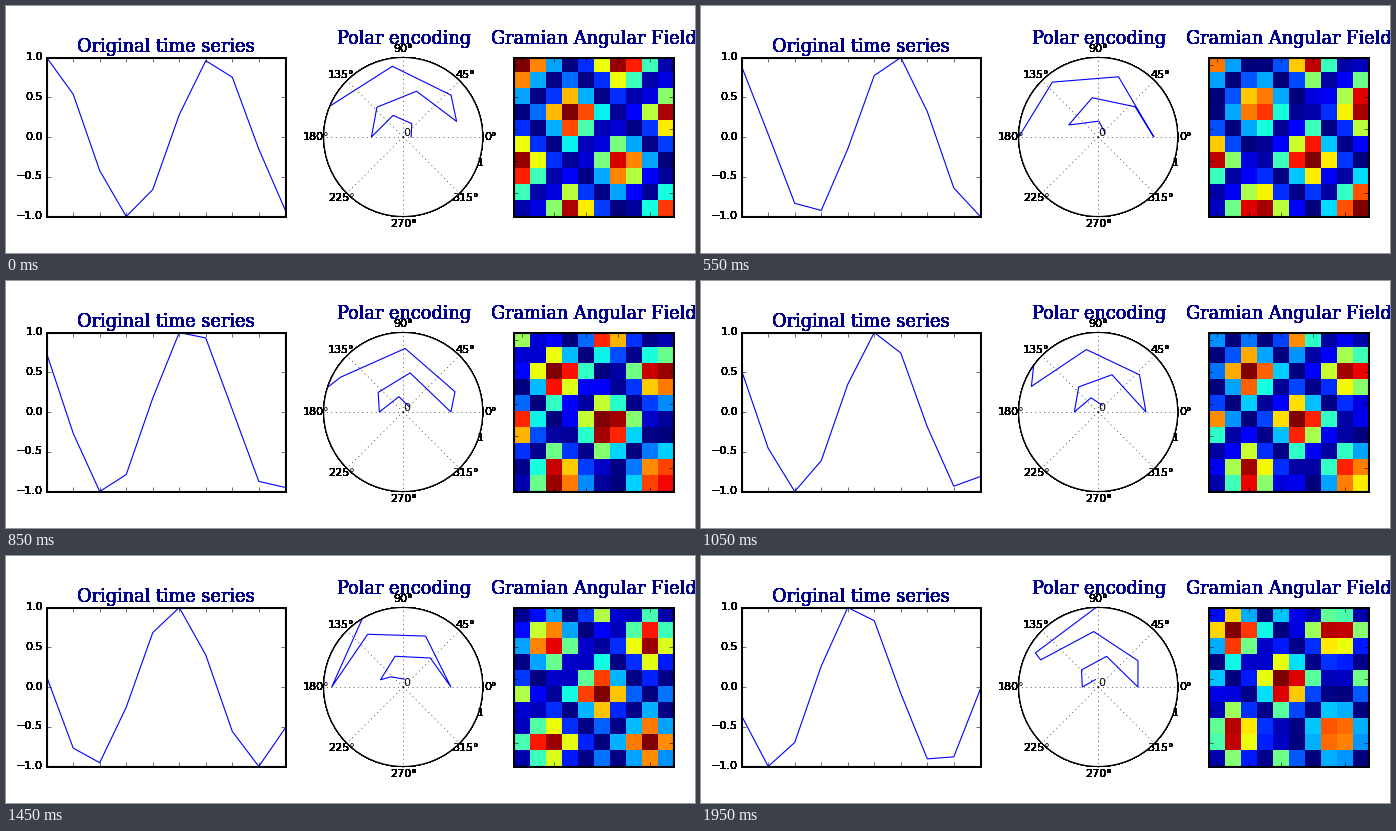
A matplotlib script that plays this animation: 689x247 px, repeating every 2 s.

```python
import numpy as np
import matplotlib.pyplot as plt
from matplotlib.animation import FuncAnimation
from matplotlib.patches import Circle, Rectangle

W, H, DPI = 689, 247, 80
FRAMES, INTERVAL = 40, 50
STEP = 0.05                  # phase advance per frame
N = 10                       # samples in the series
OVERPRINT = 16               # repeated passes give the heavy lettering
TOP, BOTTOM = 51.53, 210.47  # shared panel edges, pixels from the top
R, CX, CY = (BOTTOM - TOP) / 2, 397.2, (TOP + BOTTOM) / 2

fig = plt.figure(figsize=(W / DPI, H / DPI), dpi=DPI, facecolor="white")


def panel(x0, x1):
    return fig.add_axes([x0 / W, 1 - BOTTOM / H, (x1 - x0) / W, (BOTTOM - TOP) / H])


def framed(x0, x1, xticks, yticks):
    """Panel with inward ticks and a frame thickened on its outer side."""
    left, right, top, bottom = (int(v + 0.5) for v in (x0, x1, TOP, BOTTOM))
    fig.add_artist(Rectangle(
        ((left - 1) / W, 1 - (bottom + 2) / H), (right - left + 3) / W,
        (bottom - top + 3) / H, fc="black", lw=0, zorder=-1,
        transform=fig.transFigure))
    ax = panel(x0, x1)
    for spine in ax.spines.values():
        spine.set_linewidth(1)
    ax.set_xticks(xticks)
    ax.set_yticks(yticks)
    ax.tick_params(direction="in", length=4, width=0.5, top=True, right=True,
                   labelbottom=False, labelleft=False)
    ax.set_axisbelow(False)
    return ax


def text(x, y, s, zorder=3, **kw):
    kw = {"size": 10, "family": "DejaVu Sans", "ha": "center", "va": "center"} | kw
    fig.text(x / W, 1 - y / H, s, zorder=zorder, **kw)


def heavy(x, y, s, **kw):
    for _ in range(OVERPRINT):
        text(x, y, s, zorder=-1, **kw)


def title(x, y, s):
    heavy(x, y, s, size=16, family="DejaVu Serif", color="darkblue", va="baseline")


def label(x, y, s, **kw):
    """Heavy outside the disc, single weight where the disc covers it."""
    for put in (heavy, text):
        put(x, y - 0.4, s, **kw)


def series(n):
    """Cosine samples rescaled to span -1..1."""
    x = np.cos(np.arange(N) + STEP * n)
    lo, hi = x.min(), x.max()
    return np.clip(2 * (x - lo) / (hi - lo) - 1, -1, 1)


# Time series
levels = np.linspace(-1, 1, 5)
ax_ts = framed(40.7, 279.3, range(N), levels)
ts_line, = ax_ts.plot([], [], color="blue", lw=1)
ax_ts.set_xlim(0, N - 1)
ax_ts.set_ylim(-1, 1)
for v in levels:
    label(37, CY - R * v, f"{v:.1f}".replace("-", "\u2212"), ha="right")
title(159.7, 46, "Original time series")

# Polar encoding
ax_po = panel(CX - R, CX + R)
ax_po.axis("off")
po_line, = ax_po.plot([], [], color="blue", lw=1, zorder=2)
ax_po.add_patch(Circle((0, 0), 1, fc="white", ec="none", zorder=1))
for z in [0] * OVERPRINT + [2.6]:
    ax_po.add_patch(Circle((0, 0), 1, fc="none", ec="black", lw=1, zorder=z,
                           clip_on=False))
for deg in range(0, 360, 45):
    c, s = np.cos(np.radians(deg)), np.sin(np.radians(deg))
    ax_po.plot([0, c], [0, s], color="black", lw=0.5, ls=(0, (2, 6)), zorder=2.5)
    label(CX + 1.1 * R * c, CY - 1.1 * R * s, f"{deg}\u00b0")
ax_po.set_xlim(-1, 1)
ax_po.set_ylim(-1, 1)
tilt = np.radians(22.5)
for r in (0, 1):
    label(CX + r * R * np.cos(tilt), CY + r * R * np.sin(tilt) + 1.2, str(r),
          ha="left", va="bottom")
title(398, 38, "Polar encoding")

# Gramian angular field, its cells set half a pixel high
LIFT = 0.028
ax_gaf = framed(508.45, 667.45, range(0, N, 2), range(0, N, 2))
field = ax_gaf.imshow(np.zeros((N, N)), cmap="jet", vmin=-1, vmax=1,
                      interpolation="nearest", aspect="auto",
                      extent=(-0.5, N - 0.5, N - 0.5 - LIFT, -0.5 - LIFT))
ax_gaf.set_xlim(-0.5, N - 0.5)
ax_gaf.set_ylim(N - 0.5, -0.5)
title(588, 38, "Gramian Angular Field")


def update(n):
    x = series(n)
    phi = np.arccos(x)
    r = np.arange(1, N + 1) / N
    ts_line.set_data(np.arange(N), x)
    po_line.set_data(r * np.cos(phi), r * np.sin(phi))
    field.set_data(np.cos(phi[:, None] + phi))
    return ts_line, po_line, field


anim = FuncAnimation(fig, update, frames=FRAMES, interval=INTERVAL,
                     repeat=True, repeat_delay=0, blit=False)
plt.show()
```
